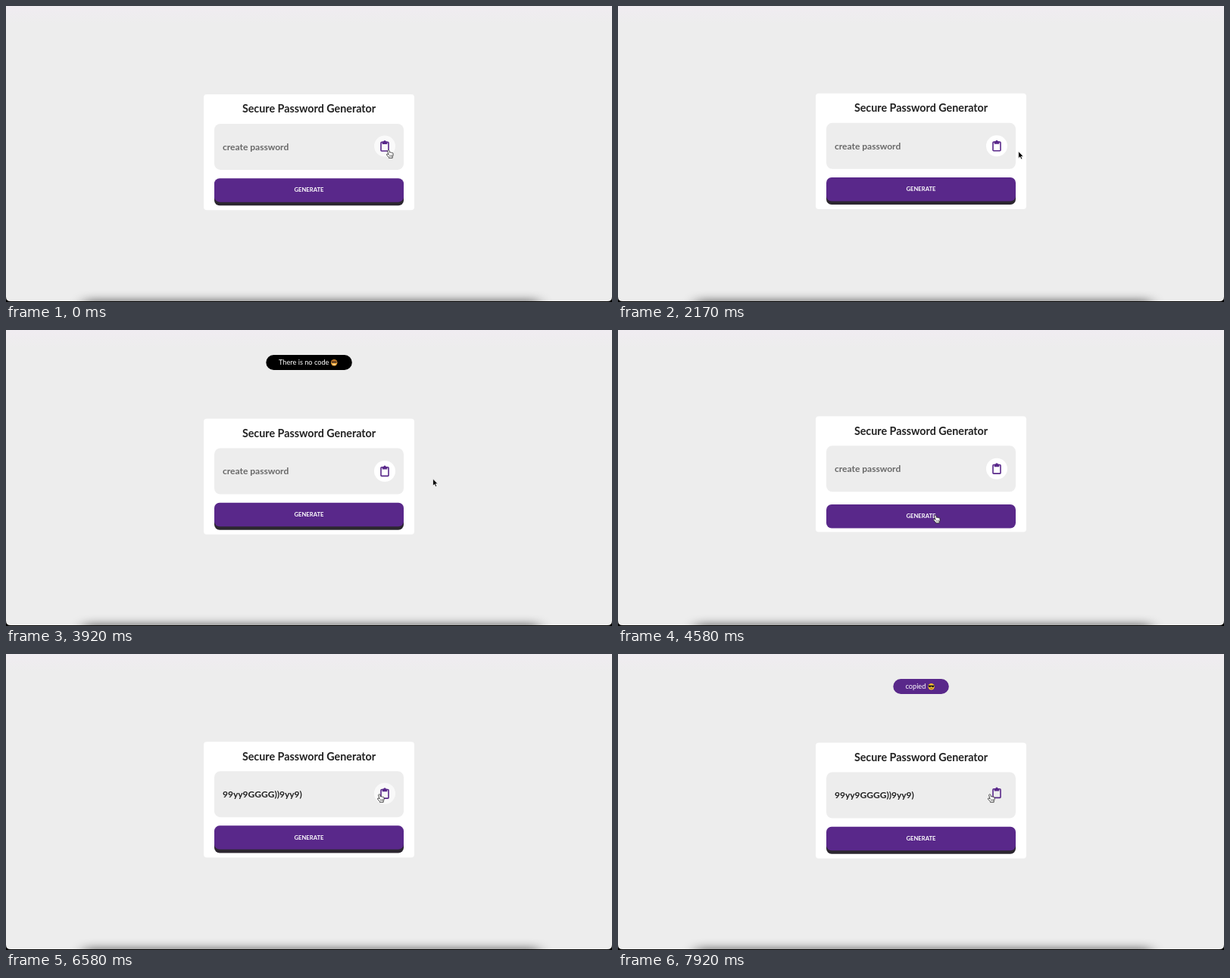
An HTML page for the animation above (8000 ms loop, 800 px wide and 392 px high).

```html
<!DOCTYPE html>
<html lang="en">
<head>
<meta charset="utf-8">
<title>Secure Password Generator</title>
<style>
  html, body { margin: 0; width: 100%; height: 100%; overflow: hidden; background: #000; }
  svg { display: block; width: 800px; height: 392px; font-family: Lato, "Open Sans", sans-serif; }
  .bold { font-weight: 700; }
  .middle { text-anchor: middle; }
  .toast { font-size: 9.2px; fill: #fff; }
</style>
</head>
<body>
<svg viewBox="0 0 800 392">
  <defs>
    <linearGradient id="sky" x2="0" y2="1">
      <stop offset="0" stop-color="#f0ecf1"/>
      <stop offset=".06" stop-color="#ededed"/>
    </linearGradient>
    <filter id="blur" x="-10%" y="-300%" width="120%" height="700%">
      <feGaussianBlur stdDeviation="9 6"/>
    </filter>
    <clipPath id="page"><path d="M0 0H800V385Q800 391 794 391H6Q0 391 0 385Z"/></clipPath>
  </defs>

  <g clip-path="url(#page)">
    <rect width="800" height="392" fill="url(#sky)"/>
    <rect x="103" y="389" width="600" height="14" fill="#000" opacity=".5" filter="url(#blur)"/>

    <g id="card">
      <rect x="261" width="278" height="153.3" rx="4" fill="#fff"/>
      <text class="bold middle" x="400" y="24.4" font-size="14.3" fill="#222">Secure Password Generator</text>
      <rect x="275" y="39" width="250" height="61" rx="8" fill="#ededed"/>
      <text id="field" class="bold" x="286" y="74" font-size="12"></text>
      <g id="icon">
        <circle id="disc" r="14" fill="#fff"/>
        <g fill="#59288a">
          <rect x="-5" y="-5.2" width="10" height="11.6" rx="1" fill="none" stroke="#59288a" stroke-width="1.6"/>
          <rect x="-3.3" y="-6" width="6.6" height="3.4" rx=".5"/>
          <circle cy="-5.8" r="1.7"/>
        </g>
      </g>
      <rect id="edge" x="275" y="115.8" width="250" height="31.5" rx="7" fill="#2c2730"/>
      <g id="button">
        <rect x="275" y="111.2" width="250" height="31.5" rx="7" fill="#59288a"/>
        <text class="bold middle" x="400" y="129.4" font-size="7.65" fill="#fff">GENERATE</text>
      </g>
    </g>

    <g id="warning" class="toast">
      <rect x="343.3" width="113.5" height="20" rx="10" fill="#000"/>
      <text x="360" y="13.5">There is no code</text>
      <g transform="translate(433.2 10.2)">
        <circle r="4.2" fill="#f5a93b"/>
        <path d="M-4-1.4Q0-6 4-1.4Z" fill="#a8601f"/>
        <path d="M-3.4-.6H3.4" stroke="#3c2a20" stroke-width="1.8"/>
        <path d="M-1.6 2.2Q0 3.2 1.6 2.2" fill="none" stroke="#fff" stroke-width=".8"/>
      </g>
    </g>
    <g id="success" class="toast">
      <rect x="363.3" width="73.5" height="20" rx="10" fill="#59288a"/>
      <text x="379.5" y="13.5">copied</text>
      <g transform="translate(413.6 10.2)">
        <circle r="4.2" fill="#f8c32f"/>
        <path d="M-4.2-1.8H4.2L3.2.8H.8L0-.6L-.8.8H-3.2Z" fill="#1d1b20"/>
        <path d="M-1.8 2Q0 3.3 1.8 2" fill="none" stroke="#7a4a12" stroke-width=".8"/>
      </g>
    </g>

    <path id="arrow" d="M0 0V9.2L2.1 7.3L3.5 10.4L5.1 9.7L3.7 6.7H6.5Z" fill="#000" stroke="#fff" stroke-width=".7"/>
    <g id="hand" stroke="#222" stroke-width=".8" stroke-linejoin="round" stroke-linecap="round">
      <path d="M-1.2.8Q-.2-.6.8.8L1.6 3.6Q2.6 2.8 3.2 3.7Q4.2 3 4.7 4Q5.8 3.6 6 4.8L6 7.6L5.2 9.2V10.8H.4V9.8L-2.6 6.6Q-2.7 5.3-1.3 5.5L-.2 6.3Z" fill="#fff"/>
      <path d="M1.7 7V9M3.1 7V9M4.4 7V9" stroke-width=".5"/>
    </g>
  </g>
</svg>

<script>
const LOOP = 8000;
const el = Object.fromEntries([...document.querySelectorAll("svg [id]")].map(node => [node.id, node]));

const clamp = v => Math.min(1, Math.max(0, v));
const mix = (a, b, p) => a + (b - a) * p;

function bezier(x1, y1, x2, y2) {
  const at = (a, b, u) => 3 * a * u * (1 - u) ** 2 + 3 * b * u * u * (1 - u) + u ** 3;
  return x => {
    let low = 0, high = 1;
    for (let i = 0; i < 20; i++) {
      const u = (low + high) / 2;
      if (at(x1, x2, u) < x) low = u; else high = u;
    }
    return at(y1, y2, (low + high) / 2);
  };
}
const ease = bezier(.25, .1, .25, 1);
const easeOut = bezier(.215, .61, .355, 1);
const smooth = p => p * p * (3 - 2 * p);

// time, x, y of the pointer's hot spot
const pointerPath = [
  [0, 505, 190.5], [650, 506, 190], [800, 511, 191], [1250, 542, 197],
  [1600, 555, 198], [1900, 554, 197], [2400, 509, 189], [2900, 506, 187],
  [3080, 511.5, 187.5], [3330, 558, 192], [3600, 565, 195], [4100, 563, 198],
  [4250, 559, 203], [4500, 419, 245], [5000, 419, 245], [5500, 430, 222],
  [5920, 432, 205], [6470, 488, 187], [6580, 493, 185.5], [8000, 491, 185.5]
];
const iconHovers = [[-100, 860], [2400, 3110], [6480, 9000]];
const press = [4500, 4700];
const within = (t, [from, to]) => t >= from && t < to;

// Floats mid -> low -> high -> mid, each leg eased.
function cardTop(t) {
  const p = (t - 2550 + LOOP) % 4000 / 4000;
  const shift = p < .25 ? mix(0, 1, ease(p * 4))
    : p < .75 ? mix(1, -1, ease((p - .25) * 2))
    : mix(-1, 0, ease((p - .75) * 4));
  return 116.1 + 2.9 * shift;
}

// Eased in at the start of a span and out again at its end.
function presence(t, [from, to], duration, curve) {
  return curve(clamp((t - from) / duration)) * (1 - curve(clamp((t - to) / duration)));
}

function pointerAt(t) {
  const i = pointerPath.findIndex(key => key[0] > t);
  const [t0, x0, y0] = pointerPath[i - 1], [t1, x1, y1] = pointerPath[i];
  const p = smooth((t - t0) / (t1 - t0));
  return [mix(x0, x1, p), mix(y0, y1, p)];
}

function move(node, x, y) {
  node.setAttribute("transform", `translate(${x} ${y})`);
}
function show(node, visible) {
  node.setAttribute("visibility", visible ? "visible" : "hidden");
}

function drawToast(node, t, span) {
  const p = presence(t, span, 400, easeOut);
  move(node, 0, mix(-83, 33, p));
  node.setAttribute("opacity", p);
}

function draw(t) {
  const top = cardTop(t);
  move(el.card, 0, top);

  const hover = Math.max(...iconHovers.map(span => presence(t, span, 500, ease)));
  move(el.icon, 500, 69.5 - 3 * hover);
  el.disc.setAttribute("opacity", 1 - hover);

  const pressed = within(t, press);
  move(el.button, 0, pressed ? 5.5 : 0);
  show(el.edge, !pressed);

  const generated = t >= press[1];
  el.field.textContent = generated ? "99yy9GGGG))9yy9)" : "create password";
  el.field.setAttribute("fill", generated ? "#222" : "#686868");

  drawToast(el.warning, t, [2685, 4145]);
  drawToast(el.success, t, [6917, 8400]);

  const [x, y] = pointerAt(t);
  const overIcon = Math.hypot(x - 500, y - top - 69.5) < 14;
  const overButton = x > 275 && x < 525 && y > top + 111 && y < top + 148;
  const pointing = overIcon || overButton;
  show(el.hand, pointing);
  show(el.arrow, !pointing);
  move(pointing ? el.hand : el.arrow, x, y);
}

function tick() {
  draw(performance.now() % LOOP);
  requestAnimationFrame(tick);
}
tick();
</script>
</body>
</html>
```
